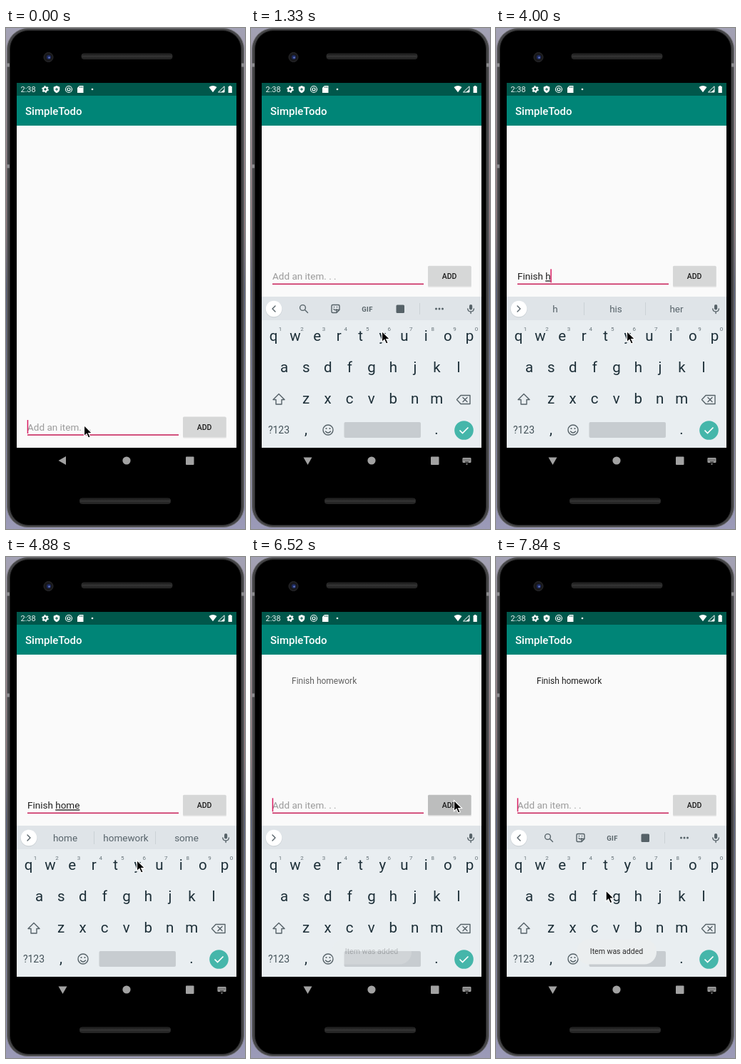
These frames come from a looping animation (335 px wide and 703 px high, 7.99 s). An HTML page:

```html
<!DOCTYPE html>
<html lang="en">
<head>
<meta charset="utf-8">
<title>Todo app on a phone</title>
<style>
  html, body { margin: 0; width: 100%; height: 100%; overflow: hidden; background: #000; }
  svg { display: block; width: 335px; height: 703px; }
  text { font-family: Roboto, sans-serif; white-space: pre; }
  .mid { text-anchor: middle; }
  .line { fill: none; stroke: #566268; stroke-width: 1.4; stroke-linejoin: round; stroke-linecap: round; }
  .gray { fill: #566268; }
  .key { font-size: 20.5px; fill: #1d2f38; }
  .digit { font-size: 8px; fill: #68747a; }
  .word { font-size: 13.5px; fill: #57636a; }
  #composing { text-decoration: underline; text-decoration-thickness: 1px; }
</style>
</head>
<body>
<svg viewBox="0 0 335 703">
  <defs>
    <linearGradient id="desk" x2="0" y2="1">
      <stop offset="0" stop-color="#a3a2b5"/>
      <stop offset=".2" stop-color="#a08b93"/>
      <stop offset=".4" stop-color="#8f7378"/>
      <stop offset=".52" stop-color="#4c5474"/>
      <stop offset=".75" stop-color="#77789a"/>
      <stop offset="1" stop-color="#9c9bb8"/>
    </linearGradient>
    <linearGradient id="slot" x2="0" y2="1">
      <stop offset="0" stop-color="#161616"/>
      <stop offset=".5" stop-color="#353535"/>
      <stop offset="1" stop-color="#1c1c1c"/>
    </linearGradient>
  </defs>

  <!-- Phone body -->
  <rect width="335" height="703" fill="url(#desk)"/>
  <rect x="1.5" y=".5" width="332" height="700" rx="29" fill="#454547" stroke="#727276"/>
  <rect x="5.5" y="3.5" width="324" height="694" rx="26" fill="#000" stroke="#202021"/>
  <path d="M1 52h4M1 194h4M330 52h4" stroke="#8b8b8e" stroke-width="5"/>
  <rect x="106" y="36" width="127" height="7.5" rx="3" fill="url(#slot)" stroke="#292929"/>
  <rect x="103.500" y="660" width="127" height="7.5" rx="3" fill="url(#slot)" stroke="#292929"/>
  <circle cx="59.500" cy="41" r="6.500" fill="#18181b" stroke="#2c2c2e"/>
  <circle cx="60" cy="41" r="3" fill="#1d2a60"/>
  <circle cx="60.500" cy="41.500" r="1.200" fill="#6b7fca"/>

  <!-- Screen -->
  <rect x="15" y="77" width="308" height="512" fill="#fafafa"/>
  <rect x="15" y="77" width="308" height="18.500" fill="#00574b"/>
  <rect x="15" y="95" width="308" height="42" fill="#008577"/>
  <g fill="#fff">
    <text x="20.500" y="90" font-size="11" fill="#e6f0ee">2:38</text>
    <circle cx="55" cy="86" r="2.700" fill="none" stroke="#fff" stroke-width="2"/>
    <circle cx="55" cy="86" r="4.200" fill="none" stroke="#fff" stroke-width="1.400" stroke-dasharray="2.200"/>
    <path d="M71 81l4.300 1.800v3q0 3.800-4.300 5.500q-4.300-1.700-4.300-5.500v-3z"/>
    <path d="M71 84v4M69 86h4" stroke="#00574b"/>
    <circle cx="88" cy="86" r="4.500" fill="none" stroke="#fff" stroke-width="1.100"/>
    <circle cx="88" cy="86" r="2" fill="none" stroke="#fff" stroke-width="1.200"/>
    <path d="M103 81h5.500v10h-8.500v-7z"/>
    <path d="M103.500 82v2M105.300 82v2M107 82v2" stroke="#00574b" stroke-width=".7"/>
    <circle cx="121" cy="86" r="1.300"/>
    <path d="M284.500 83q5.500-3.800 11 0l-5.500 7.200z"/>
    <path d="M306 81.800v8.200h-8.500z" fill="none" stroke="#fff" stroke-width="1"/>
    <path d="M306 86v4h-4.500z"/>
    <path d="M313 81h2.400v1h1.400v9h-5.200v-9h1.400z"/>
    <text x="27" y="122" font-size="15" font-weight="500">SimpleTodo</text>
  </g>
  <text id="item" x="57" y="178" font-size="12" fill="#202020">Finish homework</text>

  <g id="row">
    <text id="hint" x="30" y="565" font-size="13.500" fill="#9b9b9b">Add an item. . .</text>
    <text x="30" y="565" font-size="13.500" fill="#202020"><tspan id="done"></tspan><tspan id="composing"></tspan></text>
    <rect x="30" y="570.200" width="212" height="1.600" fill="#c9285f"/>
    <rect id="caret" y="550" width="1.500" height="19" fill="#d81b60"/>
    <rect x="248" y="546" width="61" height="29.500" rx="1.500" fill="#e3e3e3"/>
    <rect id="button" x="248" y="545.500" width="60.500" height="28.500" rx="1.500"/>
    <text class="mid" x="278" y="563.500" font-size="10.500" font-weight="500" fill="#1c1c1c">ADD</text>
  </g>

  <!-- Navigation bar -->
  <path id="back" d="M73.500 607l10.500-6v12z" fill="#a2a2a2"/>
  <circle cx="169" cy="607" r="5.600" fill="#a2a2a2"/>
  <rect x="252" y="601.500" width="11.500" height="11.500" rx="1" fill="#a2a2a2"/>

  <g id="keyboard">
    <rect x="15" y="377" width="308" height="212" fill="#e9eef1"/>
    <rect x="15" y="377" width="308" height="33" fill="#dfe4e8"/>
    <circle cx="32" cy="394.700" r="11.700" fill="#cdd3d7"/>
    <circle cx="32" cy="394" r="11.300" fill="#fff"/>
    <path id="chevron" class="line" d="M30 390l4 4l-4 4"/>
    <rect class="gray" x="306" y="388" width="4.200" height="7.500" rx="2.100"/>
    <path class="line" d="M303.800 394q.3 4 4.300 4t4.300-4M308.100 398v2.500"/>
    <g id="words">
      <path d="M123.500 385v18M209.500 385v18" stroke="#cbd2d6"/>
    </g>
    <g id="tools">
      <circle class="line" cx="72.500" cy="392.500" r="3.900"/>
      <path class="line" d="M75.500 395.500l4 4"/>
      <path class="line" d="M114.500 388.500h8q1.500 0 1.500 1.500v5.500l-4 4h-5.500q-1.500 0-1.500-1.500v-8q0-1.500 1.500-1.500zM124 395.500h-4v4M116 394.500q2 2.300 4 .3"/>
      <path class="line" d="M116.500 391.500v.2M120.500 391.500v.2"/>
      <text class="mid gray" x="163" y="397.500" font-size="9.500" font-weight="700" letter-spacing=".4">GIF</text>
      <rect class="gray" x="203.500" y="388.500" width="11.500" height="11.500" rx="1.500"/>
      <path d="M236.500 386v16" stroke="#cbd2d6"/>
      <g class="gray"><circle cx="259.500" cy="394" r="1.500"/><circle cx="264" cy="394" r="1.500"/><circle cx="268.500" cy="394" r="1.500"/></g>
    </g>
    <g id="keys"></g>
    <path class="line" d="M39 513.500l8 8h-4v6.500h-8v-6.500h-4z"/>
    <path class="line" d="M294 515.500h13v12h-13l-5.500-6zM297 518.500l6 6M303 518.500l-6 6"/>
    <text class="mid" x="39" y="569" font-size="14" fill="#45535a">?123</text>
    <text class="mid key" x="77" y="570">,</text>
    <circle class="line" cx="108" cy="564" r="7"/>
    <path class="line" d="M104.500 566q3.500 4 7 0"/>
    <circle class="gray" cx="105.500" cy="562" r="1.100"/><circle class="gray" cx="110.500" cy="562" r="1.100"/>
    <rect x="130.500" y="553" width="107.500" height="22" rx="2" fill="#c7ccd0"/>
    <text class="mid key" x="260" y="570">.</text>
    <circle cx="298.500" cy="564.500" r="13.300" fill="#45b6aa"/>
    <path d="M292.500 564.500l4 4l8-8" fill="none" stroke="#fff" stroke-width="1.700"/>
  </g>
  <g id="switcher">
    <rect x="296.500" y="603" width="12" height="7" rx="1" fill="#a2a2a2"/>
    <path d="M298 605.200h9M298 607.200h9" stroke="#000" stroke-width=".8" stroke-dasharray="1"/>
    <path d="M300 609h5" stroke="#000" stroke-width=".8"/>
    <path d="M300.800 611.300h3.400l-1.700 1.700z" fill="#a2a2a2"/>
  </g>

  <g id="toast">
    <rect x="113" y="536.500" width="112" height="35" rx="17" fill="#ebeeef"/>
    <text class="mid" x="169" y="557" font-size="10.500" fill="#2b2b2b">Item was added</text>
  </g>

  <path id="mouse" d="M0 0v15.200l3.500-3.200l2.500 5.600l2.700-1.200l-2.500-5.400h4.900z" fill="#000" stroke="#fff" stroke-width="1.100"/>
</svg>
<script>
const LOOP = 7990;
const STEP = 147;
const el = id => document.getElementById(id);
const show = (id, on) => el(id).style.opacity = +on;

function addText(parent, className, x, y, content = '') {
  const node = document.createElementNS('http://www.w3.org/2000/svg', 'text');
  node.setAttribute('class', 'mid ' + className);
  node.setAttribute('x', x);
  node.setAttribute('y', y);
  node.textContent = content;
  el(parent).append(node);
  return node;
}

[['qwertyuiop', 31.5, 439], ['asdfghjkl', 46.7, 483], ['zxcvbnm', 77, 527]].forEach(([letters, left, y], r) =>
  [...letters].forEach((letter, i) => {
    const x = left + i * 30.55;
    addText('keys', 'key', x, y, letter);
    if (r === 0) addText('keys', 'digit', x + 9.5, 425, (i + 1) % 10);
  }));
const words = [83, 168, 253].map(x => addText('words', 'word', x, 399));

// time, committed text, word being typed, caret, strip ('tools', 'blank' or suggestions)
const typing = [
  [0, '', '', 1, 'tools'],
  [290, '', '', 0, 'tools'],
  [740, '', '', 1, 'tools'],
  [1180, '', '', 0, 'tools'],
  [1920, '', 'F', 1, 'F For From'],
  [2070, '', 'Fi', 1, 'Fi First Find'],
  [2360, '', 'Fin', 1, 'Fin Find Fine'],
  [2510, '', 'Fini', 1, 'Fini Finish Finding'],
  [2810, '', 'Finish', 1, 'Finish Finished Finnish'],
  [3110, 'Finish ', '', 1, 'the my it'],
  [3550, 'Finish ', '', 0, 'the my it'],
  [4000, 'Finish ', 'h', 1, 'h his her'],
  [4140, 'Finish ', 'ho', 1, 'ho how home'],
  [4440, 'Finish ', 'home', 1, 'home homework some'],
  [4880, 'Finish ', 'home', 0, 'home homework some'],
  [5030, 'Finish ', 'homew', 1, 'homew homework home'],
  [5180, 'Finish ', 'homewo', 1, 'homewo homework home'],
  [5330, 'Finish ', 'homework', 1, 'homework homework’s homeworks'],
  [5930, 'Finish ', 'homework', 0, 'homework homework’s homeworks'],
  [6370, '', '', 1, 'blank'],
  [6810, '', '', 1, 'tools'],
  [7110, '', '', 0, 'tools'],
  [7550, '', '', 1, 'tools'],
];
const press = [[0, '#d6d7d7'], [6370, '#c8c9c9'], [6520, '#bcbdbd'], [6660, '#d6d7d7']];
const itemFade = [[0, 0], [6520, .7], [6660, 1]];
const toastFade = [[0, 0], [6520, .25], [6660, .8], [6810, 1]];
const moves = [
  [740, 5, [109.5, 557.5], [183.5, 425.5]],
  [5630, 5, [183.5, 425.5], [284.5, 341.5]],
  [6960, 7, [284.5, 341.5], [146.5, 475.5]],
];

const at = (table, t) => table.findLast(row => row[0] <= t);

function mousePosition(t) {
  const move = at(moves, t);
  if (!move) return moves[0][2];
  const [start, steps, from, to] = move;
  const p = Math.min(1, (Math.floor((t - start) / STEP) + 1) / steps);
  const eased = p * p * (3 - 2 * p);
  return from.map((v, i) => v + (to[i] - v) * eased);
}

function render(t) {
  const open = t >= 590, sliding = open && t < 740;
  const [, done, composing, caret, strip] = at(typing, t);

  el('row').setAttribute('transform', `translate(0 ${open ? -211.7 : 0})`);
  el('keyboard').setAttribute('transform', `translate(0 ${sliding ? 11 : 0})`);
  el('keyboard').style.opacity = open ? (sliding ? .8 : 1) : 0;
  el('back').setAttribute('transform', `rotate(${open ? (sliding ? -70 : -90) : 0} 79.5 607)`);
  show('switcher', open);

  el('done').textContent = done;
  el('composing').textContent = composing;
  show('hint', !(done + composing));
  show('caret', caret);
  el('caret').setAttribute('x', 29.7 + el('done').parentNode.getComputedTextLength());

  const tools = strip === 'tools', suggesting = !tools && strip !== 'blank';
  show('tools', tools);
  show('words', suggesting);
  if (suggesting) strip.split(' ').forEach((word, i) => words[i].textContent = word);
  el('chevron').setAttribute('transform', tools ? 'matrix(-1 0 0 1 64 0)' : '');

  el('button').setAttribute('fill', at(press, t)[1]);
  show('item', at(itemFade, t)[1]);
  show('toast', at(toastFade, t)[1]);
  el('mouse').setAttribute('transform', `translate(${mousePosition(t)})`);
}

const begin = performance.now();
function tick() {
  render((performance.now() - begin) % LOOP);
  requestAnimationFrame(tick);
}
tick();
</script>
</body>
</html>
```
